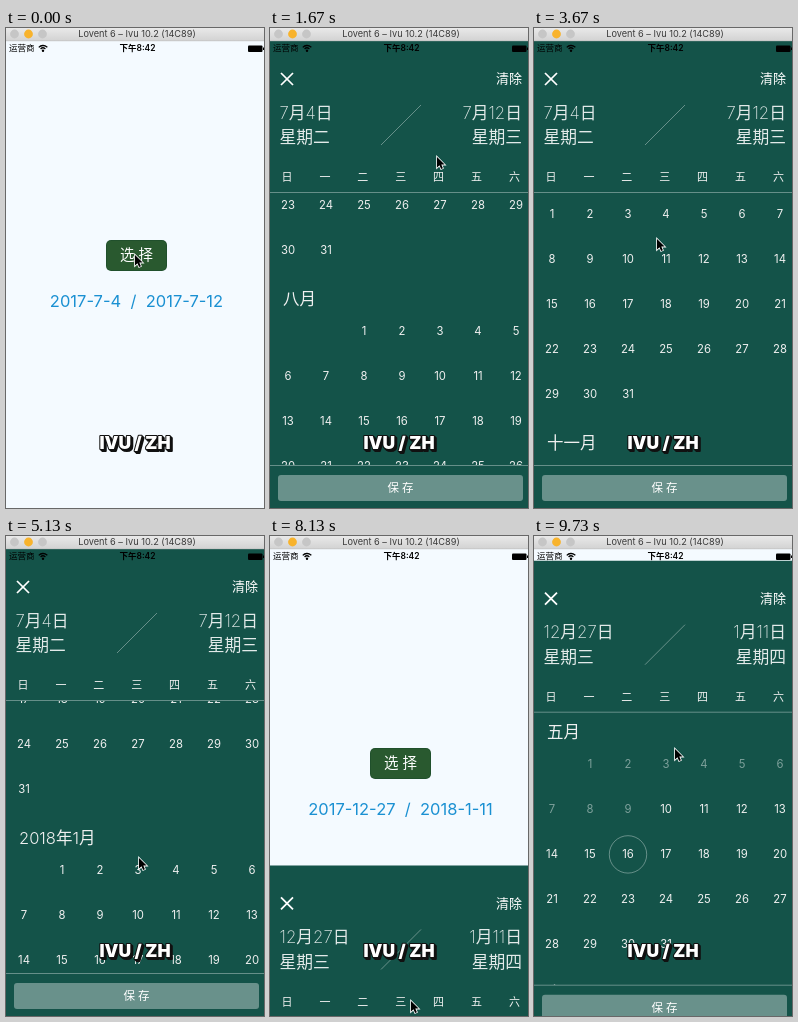
These frames come from a looping animation (258 px wide and 480 px high, 9.79 s). An HTML page with a canvas:

```html
<!DOCTYPE html>
<html lang="zh-CN">
<head>
<meta charset="utf-8">
<style>
  html, body { margin: 0; width: 100%; height: 100%; overflow: hidden; }
  canvas { display: block; width: 258px; height: 480px; }
</style>
</head>
<body>
<canvas id="stage"></canvas>
<script>
const LOOP = 9790, W = 258, H = 480;
const GREEN = '#145349', PALE = '#f0f0f0';
const white = a => `rgba(255,255,255,${a})`;
const canvas = document.getElementById('stage');
const ctx = canvas.getContext('2d');
const ratio = window.devicePixelRatio || 1;
canvas.width = W * ratio;
canvas.height = H * ratio;

const clamp = (v, lo, hi) => Math.min(hi, Math.max(lo, v));

// ---------- timing ----------
const OPEN = 200, PICK_START = 5950, PICK_END = 6870, CLOSE = 8003, REOPEN = 9426;
const DROP = 467;

// Critically damped spring, as in the system modal: 1 -> 0
const spring = ms => {
  const x = Math.max(0, ms) * 0.01826;
  return (1 + x) * Math.exp(-x);
};

function modalOffset(t) {
  if (t >= REOPEN) return DROP * spring(t - REOPEN);
  if (t >= CLOSE) return DROP * (1 - spring(t - CLOSE));
  return DROP * spring(t - OPEN);
}

// Accelerating drag, then exponential slowdown
const flings = [
  { start: 1150, drag: 250, dist: 300, tau: 325, end: 2730 },
  { start: 3350, drag: 250, dist: 207.4, tau: 325, end: 4100 },
  { start: 4100, drag: 200, dist: 109, tau: 240, end: 5130 }
];

function scrollAt(t) {
  if (t >= REOPEN) return 0;
  return flings.reduce((sum, f) => {
    const u = clamp(t, f.start, f.end) - f.start;
    if (u < f.drag) return sum + f.dist * (u / f.drag) ** 2;
    const glide = 2 * f.dist * f.tau / f.drag;
    return sum + f.dist + glide * (1 - Math.exp((f.drag - u) / f.tau));
  }, 0);
}

const pointerPath = [
  [0, 129, 227], [450, 129, 227], [1080, 163, 430], [1150, 163, 428], [1430, 167, 129],
  [2930, 167, 129], [3330, 121, 418], [3600, 123, 211], [3730, 123, 211], [4080, 130, 420],
  [4300, 133, 322], [5530, 133, 322], [5860, 133, 208], [6450, 133, 208], [6730, 165, 361],
  [7070, 165, 361], [7750, 141, 465], [8400, 141, 465], [9300, 141, 213], [LOOP, 141, 213]
];

function pointerAt(t) {
  const i = pointerPath.findIndex(p => p[0] > t);
  const [t0, x0, y0] = pointerPath[i - 1], [t1, x1, y1] = pointerPath[i];
  const u = (t - t0) / (t1 - t0), e = u * u * (3 - 2 * u);
  return [x0 + (x1 - x0) * e, y0 + (y1 - y0) * e];
}

// ---------- calendar data ----------
const NUMERALS = '日一二三四五六七八九十';
const WEEK = [...NUMERALS.slice(0, 7)];
const ROW = 45;
const day = (y, m, d) => new Date(y, m - 1, d);
const trips = {
  first: [day(2017, 7, 4), day(2017, 7, 12)],
  half: [day(2017, 12, 27), null],
  second: [day(2017, 12, 27), day(2018, 1, 11)]
};
const MIN_DAY = day(2017, 5, 10), TODAY = day(2017, 5, 16);

function monthName(y, m) {
  if (y > 2017) return `${y}年${m}月`;
  return (m > 10 ? '十' + NUMERALS[m - 10] : NUMERALS[m]) + '月';
}

let listHeight = 0;
const months = Array.from({ length: 10 }, (_, i) => {
  const first = day(2017, 5 + i, 1), y = first.getFullYear(), m = first.getMonth() + 1;
  const lead = first.getDay(), count = day(y, m + 1, 0).getDate();
  const month = { y, m, lead, count, offset: listHeight, name: monthName(y, m) };
  listHeight += Math.ceil((lead + count) / 7) * ROW + 36;
  return month;
});

// ---------- drawing helpers ----------
function text(str, x, y, size, color, { align = 'center', weight = 400 } = {}) {
  ctx.font = `${weight} ${size}px Inter, "Noto Sans CJK SC", "Noto Sans CJK", sans-serif`;
  ctx.textAlign = align;
  ctx.textBaseline = 'middle';
  ctx.fillStyle = color;
  ctx.fillText(str, x, y);
}

function box(x, y, w, h, color, radius = 0) {
  ctx.fillStyle = color;
  ctx.beginPath();
  ctx.roundRect(x, y, w, h, radius);
  ctx.fill();
}

function line(x0, y0, x1, y1, color, width) {
  ctx.strokeStyle = color;
  ctx.lineWidth = width;
  ctx.beginPath();
  ctx.moveTo(x0, y0);
  ctx.lineTo(x1, y1);
  ctx.stroke();
}

function disc(x, y, r, color) {
  ctx.fillStyle = color;
  ctx.beginPath();
  ctx.arc(x, y, r, 0, 7);
  ctx.fill();
}

// ---------- parts ----------
function drawHome(t) {
  box(0, 0, W, H, '#f4faff');
  box(100, 212, 61, 31, '#20502c', 5);
  box(101, 213, 59, 29, '#29592f', 4);
  text('选 择', 130.5, 228, 14.5, '#fff', { weight: 300 });
  const iso = d => `${d.getFullYear()}-${d.getMonth() + 1}-${d.getDate()}`;
  const trip = t < CLOSE ? trips.first : trips.second;
  text(trip.map(iso).join('  /  '), 130.5, 274.5, 16.5, '#1a90d2');
}

function drawDay(date, x, y, [from, to]) {
  const isFrom = +date === +from, isTo = to && +date === +to;
  const inside = isFrom || isTo || (to && date > from && date < to);
  if (inside) {
    const left = isFrom ? 19 : 0, right = isTo || !to ? 19 : 0;
    box(x - 19, y - 19, 38, 38, PALE, [left, right, right, left]);
  } else if (+date === +TODAY) {
    ctx.strokeStyle = white(0.5);
    ctx.lineWidth = 0.7;
    ctx.beginPath();
    ctx.arc(x, y, 18.7, 0, 7);
    ctx.stroke();
  }
  const color = inside ? GREEN : date < MIN_DAY ? white(0.45) : PALE;
  text(date.getDate(), x, y, 11.3, color);
}

function drawMonths(scroll, trip) {
  ctx.save();
  ctx.beginPath();
  ctx.rect(0, 165, W, 272);
  ctx.clip();
  for (const { y, m, lead, count, offset, name } of months) {
    const base = 185 + offset - scroll;
    if (base > 460 || base < -180) continue;
    text(name, 13, base, 16.5, PALE, { align: 'left', weight: 300 });
    for (let d = 1; d <= count; d++) {
      const cell = lead + d - 1;
      drawDay(day(y, m, d), 18 + cell % 7 * 38, base + 31.7 + Math.floor(cell / 7) * ROW, trip);
    }
  }
  ctx.restore();
}

function drawHeading(date, x, align) {
  const lines = date
    ? [`${date.getMonth() + 1}月${date.getDate()}日`, '星期' + WEEK[date.getDay()]]
    : ['结 束', '日 期'];
  lines.forEach((s, i) => text(s, x, 85.5 + i * 24.5, 16.8, white(0.88), { align, weight: 200 }));
}

function drawModal(t) {
  const offset = modalOffset(t);
  if (offset > DROP - 0.1) return;
  const trip = t < PICK_START ? trips.first : t < PICK_END ? trips.half : trips.second;
  ctx.save();
  ctx.translate(0, offset);
  box(0, 13, W, H, GREEN);
  line(11, 45, 23, 57, '#fff', 1.7);
  line(23, 45, 11, 57, '#fff', 1.7);
  text('清除', 252, 51.5, 13, '#fff', { align: 'right' });
  drawHeading(trip[0], 9.5, 'left');
  drawHeading(trip[1], 252, 'right');
  line(111, 117, 151, 77, white(0.45), 0.8);
  WEEK.forEach((s, i) => text(s, 17 + i * 37.9, 150, 11, PALE));
  drawMonths(scrollAt(t), trip);
  line(0, 164.5, W, 164.5, white(0.35), 1);
  line(0, 437.5, W, 437.5, white(0.35), 1);
  box(8, 447, 245, 26, white(trip[1] ? 0.36 : 0.17), 3);
  text('保 存', 130.5, 460.5, 11.5, white(trip[1] ? 1 : 0.45));
  ctx.restore();
}

function drawBars() {
  const shade = ctx.createLinearGradient(0, 0, 0, 13);
  shade.addColorStop(0, '#e9e9e9');
  shade.addColorStop(1, '#d2d2d2');
  box(0, 0, W, 13, shade);
  line(0, 12.8, W, 12.8, '#bcbcbc', 0.6);
  ['#c6c6c6', '#f8b32c', '#c6c6c6'].forEach((c, i) => disc(8.5 + i * 14, 6, 4.4, c));
  text('Lovent 6 – Ivu 10.2 (14C89)', 131, 6.3, 9.2, '#3a3a3a');

  text('运营商', 3, 20.8, 8.5, '#000', { align: 'left' });
  ctx.strokeStyle = '#000';
  ctx.lineWidth = 1.3;
  for (const r of [3.3, 5.8]) {
    ctx.beginPath();
    ctx.arc(37, 23.3, r, -Math.PI * 0.76, -Math.PI * 0.24);
    ctx.stroke();
  }
  disc(37, 22.8, 1.2, '#000');
  text('下午8:42', 131.5, 20.8, 8.5, '#000', { weight: 600 });
  box(242, 17.5, 14.5, 6.5, '#000', 1);
  box(257, 19.5, 1, 2.5, '#000');
}

function drawCaption() {
  const label = 'IVU / ZH';
  for (const d of [2, 1, 0]) {
    text(label, 129 + d, 416 + d, 17.5, '#111', { weight: 900 });
    ctx.lineJoin = 'round';
    ctx.strokeStyle = '#111';
    ctx.lineWidth = 2;
    ctx.strokeText(label, 129 + d, 416 + d);
  }
  text(label, 129, 416, 17.5, '#fff', { weight: 900 });
}

const arrow = new Path2D('M0 0V10.6L2.5 8.3L4.1 12L5.9 11.2L4.3 7.6H7.6Z');

function drawPointer(t) {
  ctx.save();
  ctx.translate(...pointerAt(t));
  ctx.lineJoin = 'miter';
  ctx.strokeStyle = '#fff';
  ctx.lineWidth = 1.6;
  ctx.stroke(arrow);
  ctx.fillStyle = '#000';
  ctx.fill(arrow);
  ctx.restore();
}

function render() {
  const t = performance.now() % LOOP;
  ctx.setTransform(ratio, 0, 0, ratio, 0, 0);
  drawHome(t);
  drawModal(t);
  drawBars();
  drawCaption();
  drawPointer(t);
  requestAnimationFrame(render);
}
render();
</script>
</body>
</html>
```
